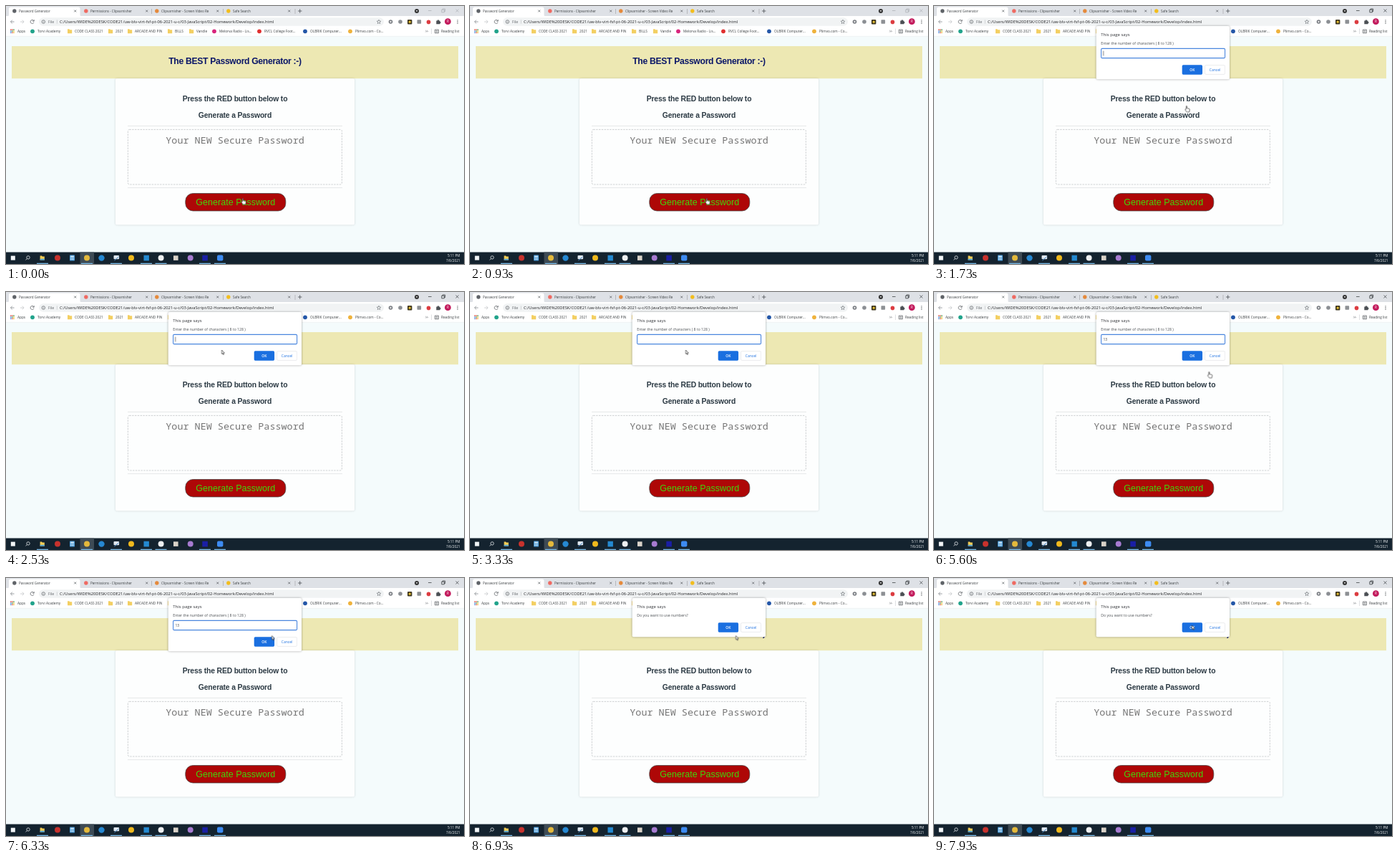
Write an HTML page that moves like this. It is 640x360 px and loops after 8 s.

```html
<!DOCTYPE html>
<html lang="en">
<head>
<meta charset="utf-8">
<title>Password Generator</title>
<style>
  html, body { margin: 0; width: 100%; height: 100%; overflow: hidden; background: #f4fbfc; }
  svg { display: block; width: 100vw; height: 100vh; }
  text { font-family: "Open Sans", "Noto Sans", sans-serif; white-space: pre; }
  .head { font-family: "Liberation Sans", Arial, sans-serif; font-weight: 700; text-anchor: middle; }
  .card { filter: drop-shadow(0 .6px 1.6px rgba(0, 0, 0, .16)); }
  .dialog { filter: drop-shadow(0 .8px 1.6px rgba(0, 0, 0, .36)); }
  .timed { opacity: 0; }
</style>
</head>
<body>
<svg viewBox="0 0 640 360" preserveAspectRatio="none">
  <rect width="640" height="360" fill="#f4fbfc"/>
  <g id="browser"></g>

  <rect x="8" y="56" width="624" height="45.2" fill="#ede8b3"/>
  <text class="head" x="320" y="81" font-size="12.2" letter-spacing="-.33" fill="#0b1768">The BEST Password Generator :-)</text>

  <rect class="card" x="153" y="101.3" width="334" height="204" rx="2" fill="#fdfefe"/>
  <g fill="#2c3a44" font-size="10.4" letter-spacing="-.18">
    <text class="head" x="320" y="133.3">Press the RED button below to</text>
    <text class="head" x="320" y="155.6">Generate a Password</text>
  </g>
  <path d="M170 167.4H470M170 253.6H470" stroke="#e0e3e4" stroke-width=".8"/>
  <rect x="170.4" y="172.4" width="299" height="76.6" rx="2" fill="#fdfefe" stroke="#c2c5c7" stroke-width=".8" stroke-dasharray="2.4 1.4"/>
  <text x="320" y="192.2" font-size="13.45" fill="#757575" text-anchor="middle" style="font-family:'Noto Sans Mono','DejaVu Sans Mono',monospace">Your NEW Secure Password</text>
  <rect x="250.8" y="261.5" width="140" height="24.4" rx="10.5" fill="#ae0707" stroke="#4a4444" stroke-width=".8"/>
  <text x="320.8" y="277.7" font-size="12.56" fill="#3fd80c" text-anchor="middle" style="font-family:'Liberation Sans',Arial,sans-serif">Generate Password</text>

  <g id="taskbar"></g>
  <g id="prompt" class="timed"></g>
  <g id="confirm" class="timed"></g>
  <g id="cursor" stroke="#222" stroke-width=".65" stroke-linejoin="round" fill="#fff">
    <path id="hand" d="M-.7 4.3V.5C-.7-.4.6-.4.6.5V3.1L3.5 3.6C4.2 3.8 4.4 4.3 4.3 4.9L3.8 8.2H.2L-2.1 5.2C-2.4 4.5-1.5 3.9-.7 4.3Z"/>
    <path id="arrow" class="timed" d="M0 0V5.4L1.2 4.4 2.1 6.5 3 6.1 2.1 4.1H3.9Z"/>
  </g>
</svg>

<script>
const LOOP = 8000;
const $ = id => document.getElementById(id);

const rect = (x, y, w, h, fill, more = "") =>
  `<rect x="${x}" y="${y}" width="${w}" height="${h}" fill="${fill}" ${more}/>`;
const dot = (x, y, r, fill, more = "") => `<circle cx="${x}" cy="${y}" r="${r}" fill="${fill}" ${more}/>`;
const line = (d, color = "#5f6368", width = .8) =>
  `<path d="${d}" fill="none" stroke="${color}" stroke-width="${width}"/>`;
const label = (x, y, size, str, fill = "#3c4043", more = "") =>
  `<text x="${x}" y="${y}" font-size="${size}" fill="${fill}" ${more}>${str}</text>`;
const folder = (x, y, fill = "#f3cf62") =>
  `<path d="M${x} ${y}h2.4l.8 1h3v5h-6.2Z" fill="${fill}"/>`;
const cross = (x, y, r, color) =>
  line(`M${x - r} ${y - r}l${2 * r} ${2 * r}M${x + r} ${y - r}l${-2 * r} ${2 * r}`, color, .7);
const lens = (x, y, r, color) =>
  line(`M${x + r} ${y}a${r} ${r} 0 1 0 ${-2 * r} 0a${r} ${r} 0 1 0 ${2 * r} 0M${x - r * .7} ${y + r * .7}l-2 2`, color, .8);
const windowButtons = color =>
  line("M590 6.5H594.6M608.8 5.2h3.6v3.6h-3.6ZM610 5.2V4H613.6V7.6H612.4", color, .7) + cross(630.5, 6.5, 1.9, color);

function drawBrowser() {
  const tabs = [
    [18, "Password Generator", "#5f6368"],
    [118, "Permissions - Clipvarnisher", "#ef6a62"],
    [217, "Clipvarnisher - Screen Video Re", "#e58a3c"],
    [317, "Safe Search", "#f2bd1d"],
  ];
  const bookmarks = [
    [44, "Torvi Academy", "#21a38b"], [96, "CODE CLASS 2021"], [153, "2021"],
    [180, "ARCADE AND PIN"], [236, "BILLS"], [266, "Vandle"],
    [298, "Melorva Radio - Lis...", "#d8247c"], [361, "RVCL College Foot...", "#e02f2f"],
    [425, "OLBRIK Computer...", "#2457a8"], [488, "Plimvo.com - Co...", "#efb23c"],
  ];
  let out = rect(0, 0, 640, 14.5, "#dee1e6") + rect(0, 14, 640, 28.5, "#fff")
    + `<path d="M2 14.5Q4 14.5 4 12V4Q4 1.5 6.5 1.5H101Q103.5 1.5 103.5 4V12Q103.5 14.5 106 14.5Z" fill="#fff"/>`;

  for (const [x, title, color] of tabs)
    out += dot(x - 6.2, 7, 2.7, color) + label(x, 8.7, 4.6, title) + cross(x + 78.7, 7, 1.4, "#4b4f54");
  out += line("M203.5 4V11M303.5 4V11M404 4V11", "#9a9da2", .6)
    + line("M408 7H413.4M410.7 4.3V9.7", "#4b4f54", .8)
    + dot(574, 7, 3, "#333") + `<path d="M572.6 6.2h2.8l-1.4 1.8Z" fill="#fff"/>`
    + windowButtons("#a9adb2") + `<g id="activeButtons" class="timed">${windowButtons("#3c3f43")}</g>`;

  out += line("M11.5 22H6.5M8.8 19.6L6.4 22L8.8 24.4", "#85898e")
    + line("M20 22H25M22.7 19.6L25.1 22L22.7 24.4", "#c4c7ca")
    + line("M38.8 20.7A2.5 2.5 0 1 0 39 22.8M39.2 19V21.2H37", "#5f6368")
    + rect(46, 16.2, 482, 11.6, "#f1f3f4", 'rx="5.8"')
    + dot(52.3, 22, 2.3, "none", 'stroke="#5f6368" stroke-width=".7"')
    + line("M52.3 21.6V23.3M52.3 20.5V21", "#5f6368", .7)
    + label(59, 23.9, 5.2, "File", "#5f6368") + line("M71.3 19.3V24.7", "#b9bcc0", .6)
    + label(75, 24, 5.75, "C:/Users/WIDE%20DESK/CODE21/uw-blv-virt-fsf-pt-06-2021-u-c/03-JavaScript/02-Homework/Develop/index.html", "#202124")
    + line("M521 19.2l.8 1.8 2 .2-1.5 1.3.4 2-1.7-1-1.7 1 .4-2-1.5-1.3 2-.2Z", "#5f6368", .6)
    + dot(537.5, 22, 2.8, "#777b80") + dot(537.5, 22, 1.2, "#e8e8e8")
    + dot(551, 22, 2.8, "#8b8e93") + rect(561, 19, 6.4, 6.4, "#40381f", 'rx="1"')
    + dot(564.2, 22.2, 1.6, "#e3bd31") + rect(574.5, 19.2, 5.6, 5.6, "#8d9094", 'rx=".8"')
    + dot(590.5, 22.4, 2.8, "#dc3c41")
    + `<path d="M601.3 20.4h1.5a1.1 1.1 0 0 1 2.2 0h1.5v1.6a1.1 1.1 0 0 1 0 2.2v1h-5.2Z" fill="#4b4f54"/>`
    + dot(617.4, 21.7, 4.4, "#c2185b") + label(617.4, 23.4, 4.6, "R", "#fff", 'text-anchor="middle"');
  for (const y of [19.8, 22, 24.2]) out += dot(631, y, .65, "#4b4f54");

  const appColors = ["#e05040", "#e05040", "#49a35a", "#4a86e0", "#49a35a", "#eebc3a", "#4a86e0", "#e05040", "#eebc3a"];
  appColors.forEach((c, i) => out += rect(6 + i % 3 * 2.1, 32.3 + Math.floor(i / 3) * 2.1, 1.5, 1.5, c));
  out += label(16, 37.2, 4.75, "Apps");
  for (const [x, name, color] of bookmarks)
    out += (color ? dot(x - 7, 35.3, 2.9, color) : folder(x - 10, 32.3)) + label(x, 37.2, 4.75, name);
  out += line("M586.3 34l1.2 1.2-1.2 1.2M588.3 34l1.2 1.2-1.2 1.2", "#4b4f54", .6)
    + line("M594.5 31.5V39", "#c9ccd0", .6)
    + line("M599.4 33H604.4V37.8H599.4ZM600.6 34.6H603.2M600.6 36.2H603.2", "#4b4f54", .7)
    + label(608, 37.2, 4.75, "Reading list") + line("M0 42.3H640", "#e6eaeb", .6);
  $("browser").innerHTML = out;
}

function drawTaskbar() {
  const y = 351.6;
  let out = rect(0, 343.5, 640, 16.5, "#14232f") + rect(103.5, 343.5, 19.5, 16.5, "#3e4b55")
    + rect(6.8, y - 3, 6, 6, "#f2f5f7") + lens(31, y - .7, 2.2, "#e6eaec")
    + folder(47.6, y - 3, "#f4cd55") + rect(47.6, y + 1.2, 6.2, 1.8, "#4ba3dc")
    + dot(72, y, 4, "#c8322d") + rect(89, y - 4, 7, 8, "#4b9ad6", 'rx=".8"') + rect(90.2, y - 2.9, 4.6, 1.6, "#e8f2f8");
  for (let i = 0; i < 6; i++) out += rect(90.2 + i % 3 * 1.7, y - .4 + Math.floor(i / 3) * 1.8, 1.1, 1.1, "#e8f2f8");
  out += dot(113, y, 4, "#e4b93c") + dot(133.5, y, 4.2, "#2688d2")
    + rect(150.5, y - 3.6, 7.6, 5.2, "#dfe7ee", 'rx="1"') + line(`M151.5 ${y + 3.5}L157.5 ${y - 1.8}`, "#4d8fce", 1)
    + dot(175, y, 4, "#f0b91d") + rect(192.5, y - 3.8, 7.4, 7.6, "#2489d0")
    + dot(216.6, y, 4, "#eef0f1") + rect(234, y - 3.3, 6.6, 6.6, "#d9d2c8")
    + dot(257.7, y, 4, "#a77bd1") + rect(274.3, y - 3.8, 7.6, 7.6, "#1a1fa5")
    + rect(295, y - 4, 8.4, 8, "#3d8bf2", 'rx="2"');
  for (const x of [51, 113, 154, 196, 216.5, 278, 299]) out += rect(x - 8, 358.7, 16, 1.3, "#73b4e0");
  out += label(634.5, 350.3, 4.7, "5:11 PM", "#f0f3f5", 'text-anchor="end"')
    + label(634.5, 357.4, 4.7, "7/6/2021", "#f0f3f5", 'text-anchor="end"');
  $("taskbar").innerHTML = out;
}

function dialog(height, message, content = "") {
  const top = 28 + height - 20;
  return rect(226.7, 28, 186.3, height, "#fff", 'rx="2" class="dialog"')
    + label(233.3, 42, 6, "This page says", "#303236")
    + label(233.3, 53.6, 5.15, message, "#4c5054") + content
    + rect(346.7, top, 28.4, 13.4, "#1a6fe0", 'rx="1.6"')
    + rect(378.6, top + .3, 28, 12.8, "#fff", 'rx="1.6" stroke="#e2e4e7" stroke-width=".7"')
    + label(360.9, top + 8.6, 5, "OK", "#fff", 'text-anchor="middle" font-weight="600"')
    + label(392.6, top + 8.6, 5, "Cancel", "#1a6fe0", 'text-anchor="middle"');
}

const entry = rect(233.6, 59.4, 173, 13.2, "#fff", 'rx="1.4" stroke="#4a86de" stroke-width="1.1"')
  + `<g class="timed" id="one">${label(236.4, 67.8, 5, "1")}</g>`
  + `<g class="timed" id="thirteen">${label(236.4, 67.8, 5, "13")}</g>`
  + `<path id="caret" class="timed" d="M0 62.6V69.4" stroke="#222" stroke-width=".6"/>`;

drawBrowser();
drawTaskbar();
$("prompt").innerHTML = dialog(74.3, "Enter the number of characters ( 8 to 128 )", entry);
$("confirm").innerHTML = dialog(54.3, "Do you want to use numbers?");

// Each step is [time, properties]; the last pose holds to the end of the loop.
function play(id, steps, easing) {
  const frames = steps.map(([time, props]) => ({ ...props, offset: time / LOOP, easing }));
  frames.push({ ...frames.at(-1), offset: 1 });
  $(id).animate(frames, { duration: LOOP, iterations: Infinity });
}

function toggle(id, times, visible = 0) {
  const steps = [[0, { opacity: visible }]];
  for (const time of times) steps.push([time, { opacity: visible = 1 - visible }]);
  play(id, steps, "step-end");
}

const OPEN = 1300, FIRST_KEY = 4200, SECOND_KEY = 4550, ACCEPT = 6600;
const EDGE_CROSSINGS = [2060, 5270, 5880];

toggle("activeButtons", [OPEN]);
toggle("prompt", [OPEN, ACCEPT]);
toggle("confirm", [ACCEPT]);
toggle("one", [FIRST_KEY, SECOND_KEY]);
toggle("thirteen", [SECOND_KEY]);
toggle("arrow", EDGE_CROSSINGS);
toggle("hand", EDGE_CROSSINGS, 1);

// The caret blinks every 530 ms and restarts at each key press.
const caret = [[0, { opacity: 0, transform: "translateX(236.7px)" }]];
[[OPEN, FIRST_KEY, 236.7], [FIRST_KEY, SECOND_KEY, 239.6], [SECOND_KEY, ACCEPT, 242.5]].forEach(([from, to, x]) => {
  for (let time = from, on = 1; time < to; time += 530, on = 1 - on)
    caret.push([time, { opacity: on, transform: `translateX(${x}px)` }]);
});
play("caret", caret, "step-end");

// The pointer stays where it accepted the first dialog until it heads for the second one.
const path = [
  [0, 331, 268.6], [1250, 331, 268.6], [1730, 353, 139.6],
  [2300, 301.5, 81], [3500, 301.5, 81], [3900, 306, 77], [4900, 306, 77],
  [5480, 384.5, 111.6], [5650, 384.5, 111.6], [6250, 371.5, 80.5],
  [7050, 371.5, 80.5], [7700, 360.4, 66],
];
play("cursor", path.map(([time, x, y]) => [time, { transform: `translate(${x}px, ${y}px)` }]), "ease-in-out");
</script>
</body>
</html>
```
